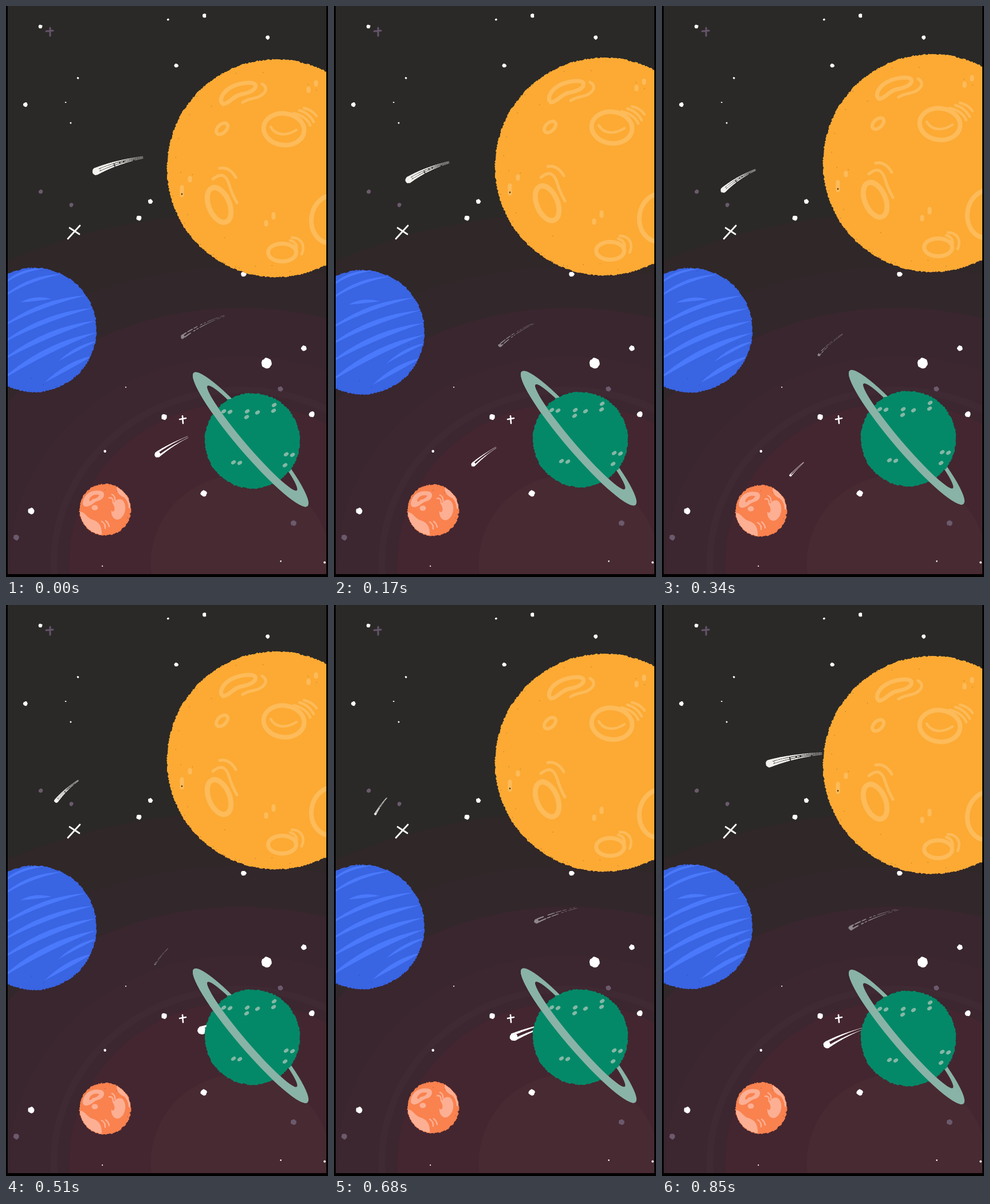
An HTML page with a canvas for the animation above (1020 ms loop, 562 by 996 pixels).

```html
<!DOCTYPE html>
<html lang="en">
<head>
<meta charset="utf-8">
<title>Drifting planets</title>
<style>
  html, body { margin: 0; width: 100%; height: 100%; overflow: hidden; background: #000; }
  canvas { display: block; }
</style>
</head>
<body>
<canvas id="stage" width="562" height="996"></canvas>
<script>
const ctx = document.getElementById('stage').getContext('2d');
const STEP = 170, POSES = 6;

// Each comet flies along a quadratic curve (from, via, to), starting at pose `first`
const COMETS = [
  { first: 5, from: [280, 259], via: [124, 272], to: [72, 365], width: 13, tail: 0.33, strands: 3, gaps: 0.06, color: '#f4f2ef' },
  { first: 4, from: [424, 528], via: [306, 556], to: [260, 627], width: 8, tail: 0.42, strands: 2, gaps: 0.3, color: '#8f868a' },
  { first: 3, from: [420, 722], via: [292, 743], to: [224, 819], width: 14, tail: 0.32, strands: 2, gaps: 0, color: '#fff' }
];

// Key stars; they grow towards the bottom of the picture
const STARS = [[346, 17], [60, 36], [457, 55], [297, 104], [34, 172], [252, 341], [232, 370],
  [415, 468], [520, 597], [534, 712], [276, 717], [345, 850], [44, 881]];
const DIM_STARS = [[61, 324], [114, 347], [479, 668], [502, 902], [18, 927]];

let seed = 1;
function rnd() {
  seed = (seed * 16807) % 2147483647;
  return seed / 2147483647;
}

const lerp = (a, b, t) => a + (b - a) * t;
const smooth = t => (1 - Math.cos(Math.PI * t)) / 2;
const easeOut = t => 1 - (1 - t) ** 2;

// Eased move from high to low over `fall` poses, then a steady return
function bob(pose, high, low, start, fall, ease) {
  const k = (pose - start + POSES) % POSES;
  return k <= fall ? lerp(high, low, ease(k / fall)) : lerp(low, high, (k - fall) / (POSES - fall));
}

function oval(x, y, rx, ry, turn = 0) {
  ctx.beginPath();
  ctx.ellipse(x, y, rx, ry, turn, 0, 7);
}

function fillOval(color, ...shape) {
  ctx.fillStyle = color;
  oval(...shape);
  ctx.fill();
}

function strokeOval(width, ...shape) {
  ctx.lineWidth = width;
  oval(...shape);
  ctx.stroke();
}

function strokePath(width, d) {
  ctx.lineWidth = width;
  ctx.stroke(new Path2D(d));
}

function fillPath(color, d) {
  ctx.fillStyle = color;
  ctx.fill(new Path2D(d));
}

// Disc with a chalky edge
function chalkDisc(x, y, r, color, rough = 1.2) {
  const count = Math.max(10, Math.round(r * 3));
  ctx.beginPath();
  for (let i = 0; i < count; i++) {
    const a = i / count * Math.PI * 2, d = r + (rnd() - 0.5) * rough;
    ctx.lineTo(x + Math.cos(a) * d, y + Math.sin(a) * d);
  }
  ctx.fillStyle = color;
  ctx.fill();
}

function planet(x, y, r, color, speckColor) {
  chalkDisc(x, y, r, color, 2.2);
  ctx.fillStyle = speckColor;
  for (let i = 0; i < r / 3; i++) {
    const a = rnd() * 7, d = r * (1 - 0.25 * rnd() ** 4);
    ctx.fillRect(x + Math.cos(a) * d, y + Math.sin(a) * d, 1, 1);
  }
}

// Leaf-shaped stripe bowed upwards
function stripe(x0, y0, x1, y1, width, bow) {
  const cx = (x0 + x1) / 2 - bow / 2, cy = (y0 + y1) / 2 - bow;
  ctx.beginPath();
  ctx.moveTo(x0, y0);
  ctx.quadraticCurveTo(cx, cy - width, x1, y1);
  ctx.quadraticCurveTo(cx, cy + width, x0, y0);
  ctx.fill();
}

function drawSky() {
  const arc = r => [410, 972, r * (1 + 0.33 * (r / 610) ** 2), r];
  ctx.fillStyle = '#2a2927';
  ctx.fillRect(0, 0, 562, 996);
  fillOval('#302728', ...arc(610));
  fillOval('#32272a', ...arc(517));
  fillOval('#39262e', ...arc(446));
  fillOval('#3c262f', ...arc(362));
  ctx.strokeStyle = '#3f2932';
  strokeOval(12, ...arc(302));
  fillOval('#442630', ...arc(280));
  fillOval('#482a32', ...arc(154));
}

function drawStars() {
  for (const [x, y] of STARS) chalkDisc(x, y, 3.5 + y / 450, '#fff');
  for (const [x, y] of DIM_STARS) chalkDisc(x, y, 3 + y / 450, '#6b5a6c');
  chalkDisc(455, 623, 9, '#fff');
  for (let i = 0; i < 10; i++) chalkDisc(rnd() * 560, rnd() * 990, 1 + rnd() * 1.6, '#fff', 0.6);
  ctx.strokeStyle = '#65546a';
  strokePath(3, 'M70 44L82 43M77 38L77 52');
  ctx.strokeStyle = '#fff';
  strokePath(2.6, 'M303 721L314 719M308 715L309 728');
  strokePath(2.8, 'M108 406L129 383M111 387L128 398');
}

function drawComet(comet, pose) {
  const { first, from, via, to, width, tail, strands, gaps, color } = comet;
  const life = (pose - first + POSES) % POSES / (POSES - 1);
  const head = lerp(1 / 3, 1, life);
  const reach = Math.min(head, tail * (1 - 0.5 * life ** 3));
  const size = width * (1 - 0.72 * life ** 2);
  const along = (u, axis) => lerp(lerp(from[axis], via[axis], u), lerp(via[axis], to[axis], u), u);
  const point = (t, side) => {
    const u = head - reach * t, x = along(u, 0), y = along(u, 1);
    const dx = along(u + 0.01, 0) - x, dy = along(u + 0.01, 1) - y, len = Math.hypot(dx, dy);
    return [x + dy / len * side, y - dx / len * side];
  };
  ctx.strokeStyle = color;
  for (let k = 0; k < strands; k++) {
    const spread = (k / (strands - 1) - 0.5) * size * 0.7;
    for (let t = 0; t < 1; t += 0.04) {
      if (rnd() < gaps) continue;
      ctx.lineWidth = Math.max(0.5, size * 0.3 * (1 - t));
      ctx.beginPath();
      ctx.moveTo(...point(t, spread * (1 - 0.65 * t)));
      ctx.lineTo(...point(t + 0.04, spread * (1 - 0.65 * (t + 0.04))));
      ctx.stroke();
    }
  }
  chalkDisc(...point(0, 0), size / 2, color, 1);
}

function drawSun() {
  const light = '#fdbb5a';
  planet(471, 283, 190, '#fcaa34', '#8a6128');
  ctx.strokeStyle = light;
  strokePath(7, 'M379 171C371 166 377 152 389 144C404 134 429 131 435 137C438 145 427 151 411 154C395 157 391 170 379 171Z');
  strokePath(5, 'M447 136C457 142 455 151 442 158C431 163 425 160 413 168');
  strokeOval(6, 377, 214, 12, 7.5, -0.75);
  strokeOval(8, 485, 215, 35.5, 27.5, 0.12);
  strokePath(4.5, 'M462 211C472 228 492 226 507 216');
  strokePath(4.5, 'M502 187Q524 192 531 208M512 182Q528 186 537 202M520 178Q534 181 542 192');
  strokeOval(9, 372, 347, 18, 32, -0.4);
  strokePath(5, 'M361 302C377 289 385 296 390 313Q394 327 403 343M373 283Q390 280 401 299');
  strokeOval(7, 482, 430, 24.5, 15.5);
  strokePath(4.5, 'M496 409Q509 412 507 427M499 404C515 404 523 417 516 433');
  strokeOval(8, 568, 372, 35, 42, 0.15);
  strokePath(7, 'M321 300v4M528 144v4M541 133v4M454 377v4M467 363v6M307 316v14');
  fillOval('#4a3418', 307, 328, 1.3, 1.5);
}

function drawBlue() {
  const x = 49.5, y = 565, r = 108.5;
  planet(x, y, r, '#3964e2', '#26439c');
  ctx.save();
  oval(x, y, r - 1, r - 1);
  ctx.clip();
  ctx.fillStyle = '#4a79fb';
  for (let i = 0; i < 7; i++) {
    if (i === 2) continue;
    const a = -1.4 + 0.3 * i - 0.01 * i * i;
    stripe(-12, 492 + 20 * i + 1.2 * i * i, x + r * Math.cos(a), y + r * Math.sin(a), 5 + i, 16);
  }
  stripe(25, 517, 80, 511, 6, 5);
  stripe(91, 620, 160, 584, 6, 6);
  stripe(67, 657, 152, 610, 9, 6);
  ctx.restore();
}

function drawRing(frontOnly) {
  ctx.save();
  ctx.translate(427, 756);
  ctx.rotate(0.864);
  if (frontOnly) {
    ctx.beginPath();
    ctx.rect(-160, 0, 320, 40);
    ctx.clip();
  }
  ctx.beginPath();
  ctx.ellipse(0, 0, 153, 24.5, 0, 0, 7);
  ctx.closePath();
  ctx.moveTo(120, -3.5);
  ctx.ellipse(0, -3.5, 120, 14.5, 0, 0, 7);
  ctx.fillStyle = '#89b3a6';
  ctx.fill('evenodd');
  ctx.restore();
}

function drawGreen() {
  drawRing(false);
  planet(430, 758.5, 83, '#048968', '#06674f');
  const pair = (x, y, dx, dy) => {
    fillOval('#84b7a5', x, y, 4.6, 2.9, -0.6);
    fillOval('#84b7a5', x + dx, y + dy, 4.6, 2.9, -0.6);
  };
  for (const [x, y] of [[380, 707], [397, 796], [489, 782]]) pair(x, y, 11, 1);
  for (const [x, y] of [[421, 707], [468, 696]]) pair(x, y, -1, 10);
  pair(439, 709, 48, 92);
  drawRing(true);
}

function drawOrange() {
  const base = '#f9824f', light = '#fcaf93';
  planet(173, 877.5, 45, base, '#8f4d38');
  ctx.save();
  oval(173, 877.5, 44.5, 44.5);
  ctx.clip();
  fillPath(light, 'M134 866C136 848 152 842 166 845C174 847 172 858 164 861C154 863 151 870 142 872Q134 873 134 866Z');
  fillPath(base, 'M145 860Q150 849 163 852Q159 859 151 859Q146 866 145 860Z');
  fillPath(light, 'M193 838Q193 851 206 856Q213 861 214 875L222 875L216 845Z');
  fillPath(light, 'M125 881C139 880 138 890 151 895C164 899 168 908 167 924L135 924Z');
  fillOval(light, 196, 877, 12, 18, 0.2);
  fillOval(base, 185, 873, 4, 8, -0.3);
  fillOval(light, 155, 874, 5.5, 4.5);
  ctx.strokeStyle = light;
  strokePath(2.5, 'M180 857Q187 855 187 866M185 851Q191 854 190 861M167 898Q174 902 173 910M174 897Q179 901 180 907');
  ctx.restore();
}

function shifted(dy, paint) {
  ctx.save();
  ctx.translate(0, dy);
  paint();
  ctx.restore();
}

function draw(pose) {
  ctx.fillStyle = '#000';
  ctx.fillRect(0, 0, 562, 996);
  ctx.save();
  ctx.beginPath();
  ctx.rect(3, 0, 556, 991);
  ctx.clip();
  ctx.lineCap = ctx.lineJoin = 'round';
  seed = 4211;
  drawSky();
  drawStars();
  for (const comet of COMETS) drawComet(comet, pose);
  seed = 977;
  shifted(bob(pose, 0, -12, 0, 3, smooth), drawSun);
  shifted(bob(pose, 4, -4, 1, 4, easeOut), drawBlue);
  shifted(bob(pose, 0, -5, 0, 4, easeOut), drawGreen);
  shifted(bob(pose, 3, -1, 2, 2, smooth), drawOrange);
  ctx.restore();
}

let shown = -1;
function tick() {
  const pose = Math.floor(performance.now() / STEP) % POSES;
  if (pose !== shown) draw(shown = pose);
  requestAnimationFrame(tick);
}
tick();
</script>
</body>
</html>
```
